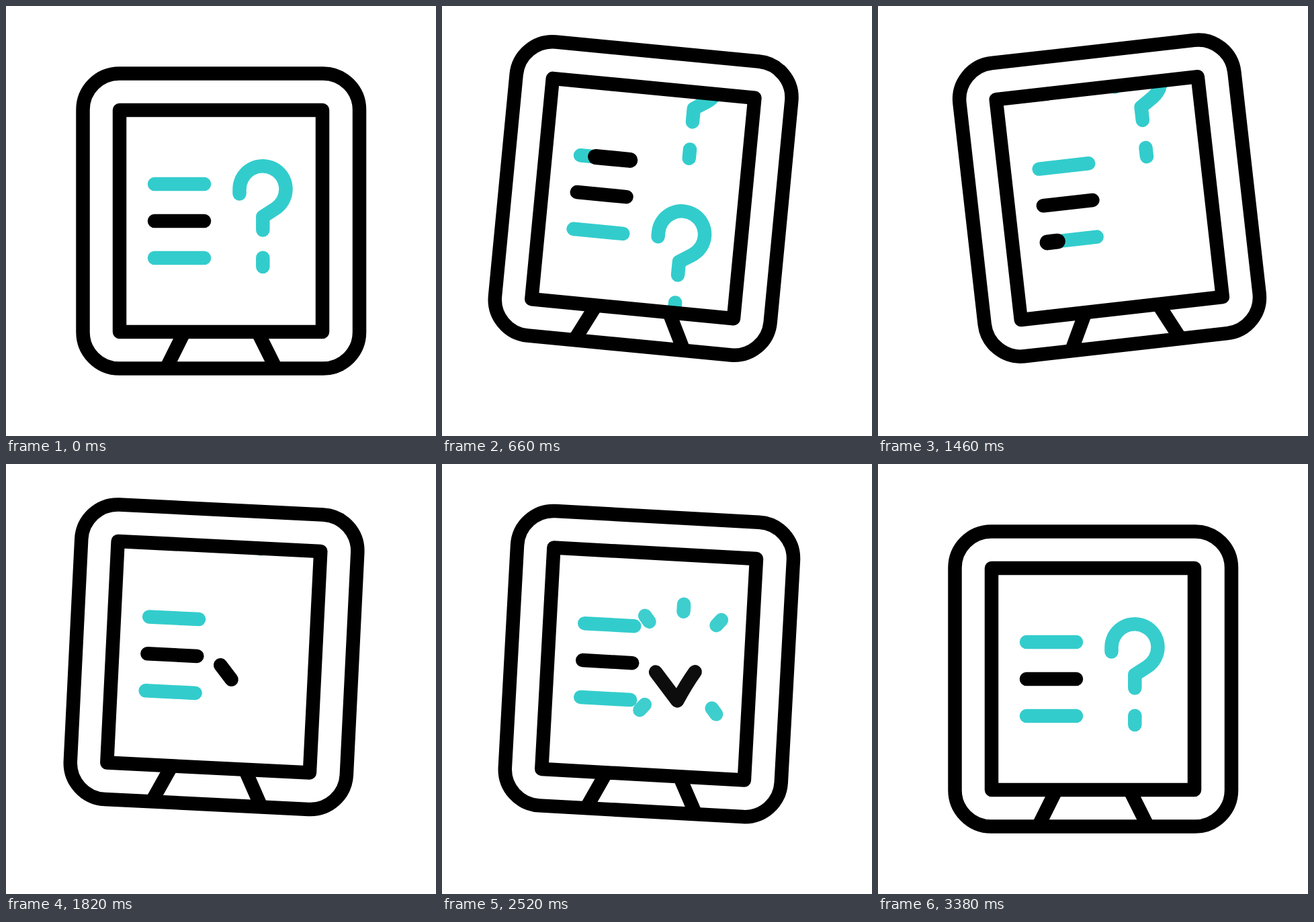
An HTML page for the animation above (3520 ms loop, 640 by 640 pixels).

```html
<!DOCTYPE html>
<html lang="en">
<head>
<meta charset="utf-8">
<title>Swinging quiz board</title>
<style>
  html, body { margin: 0; width: 100%; height: 100%; overflow: hidden; background: #fff; }
  svg { display: block; width: 100vw; height: 100vh; }
  .ink, .ink * { fill: none; stroke-width: 20.5; stroke-linecap: round; stroke-linejoin: round; }
  .black { stroke: #000; }
  .teal { stroke: #33cccc; }
  .ink .sweep { stroke-width: 23; }
</style>
</head>
<body>
<svg viewBox="0 0 640 640">
  <defs>
    <clipPath id="panel"><rect x="170" y="156" width="300" height="328"/></clipPath>
    <g id="mark">
      <path d="M347.5 279.5V272.5A34.5 34.5 0 1 1 401 301.5L382.3 313.7V333.5"/>
      <path d="M382.3 374.7V388"/>
    </g>
  </defs>
  <g id="board" class="ink">
    <g id="lines"></g>
    <g clip-path="url(#panel)">
      <g id="strip" class="teal">
        <use href="#mark"/>
        <g id="copies">
          <use href="#mark" y="229"/>
          <use href="#mark" y="458"/>
        </g>
      </g>
    </g>
    <g id="answer">
      <path id="check" class="black" pathLength="1" d="M330.5 331.5L365 372.5Q377 347 389 328"/>
      <g id="rays" class="teal"></g>
    </g>
    <g class="black">
      <path d="M265.5 485L238.5 539M374.5 485L401.5 539" style="stroke-linecap:butt"/>
      <rect x="169" y="155" width="302" height="330"/>
      <rect x="114.5" y="100.5" width="411.5" height="439" rx="54"/>
    </g>
  </g>
</svg>
<script>
const LOOP = 3520, STEP = 20, LEFT = 221, RIGHT = 295;
const $ = id => document.getElementById(id);
const [board, lines, strip, copies, answer, check, rays] =
  ['board', 'lines', 'strip', 'copies', 'answer', 'check', 'rays'].map($);

const unit = (t, from, to) => Math.min(1, Math.max(0, (t - from) / (to - from)));
const ease = (t, from, to) => {
  const x = unit(t, from, to);
  return x * x * (3 - 2 * x);
};

function set(el, attrs) {
  for (const name in attrs) el.setAttribute(name, attrs[name]);
  return el;
}
function addLine(parent, attrs) {
  const el = document.createElementNS('http://www.w3.org/2000/svg', 'line');
  return parent.appendChild(set(el, attrs));
}

// Each text line carries a sweep in the other colour
const sweeps = [265, 320, 375].map((y, i) => {
  const [base, over] = i === 1 ? ['black', 'teal'] : ['teal', 'black'];
  addLine(lines, { x1: LEFT, x2: RIGHT, y1: y, y2: y, class: base });
  return addLine(lines, { y1: y, y2: y, class: over + ' sweep' });
});
const burst = [-90, -129, -51, 129, 51].map(deg => {
  const a = deg * Math.PI / 180;
  return { el: addLine(rays, {}), dx: Math.cos(a), dy: Math.sin(a) };
});

function swing(t) {
  return 6 * ease(t, 200, 762) - 13 * ease(t, 762, 1380)
    + 13 * ease(t, 1380, 2028) - 6 * ease(t, 2028, 3046);
}
function scroll(t) {
  return 330 * unit(t, 195, 980) ** 1.72
    + 372 * (1 - (1 - unit(t, 980, 1930)) ** 1.6);
}

function draw(time) {
  const t = Math.min(3380, Math.floor(time / STEP) * STEP);

  const lift = 32.5 * (ease(t, 195, 640) - ease(t, 2200, 3050));
  set(board, { transform: `translate(0 ${-lift}) rotate(${swing(t)} 320 104)` });

  sweeps.forEach((el, i) => {
    const s = t - i * 160, width = RIGHT - LEFT;
    const grow = ease(s, 505, 750), gone = ease(s, 935, 1225);
    set(el, {
      x1: RIGHT - width * grow,
      x2: RIGHT - width * gone,
      visibility: grow > 0 && gone < 1 ? 'visible' : 'hidden'
    });
  });

  // The first mark returns in place once the board settles
  const back = t >= 2300;
  set(strip, {
    transform: `translate(0 ${back ? 0 : -scroll(t)})`,
    opacity: back ? ease(t, 2980, 3420) : t < 1930 ? 1 : 0
  });
  // The copies wait below the panel, then close up
  set(copies, {
    transform: `translate(0 ${30 * (1 - ease(t, 200, 560))})`,
    visibility: back ? 'hidden' : 'visible'
  });

  set(answer, { opacity: t > 1700 ? 1 - ease(t, 2480, 2760) : 0 });
  set(check, { 'stroke-dasharray': `${ease(t, 1700, 2060)} 2` });
  const out = ease(t, 1850, 2160);
  set(rays, { visibility: out > 0 ? 'visible' : 'hidden' });
  for (const { el, dx, dy } of burst) {
    const near = 50 + 29.5 * out, far = 50 + 40.5 * out;
    set(el, {
      x1: 367 + dx * near, y1: 319 + dy * near,
      x2: 367 + dx * far, y2: 319 + dy * far
    });
  }
}

const start = performance.now();
function frame() {
  draw((performance.now() - start) % LOOP);
  requestAnimationFrame(frame);
}
frame();
</script>
</body>
</html>
```
